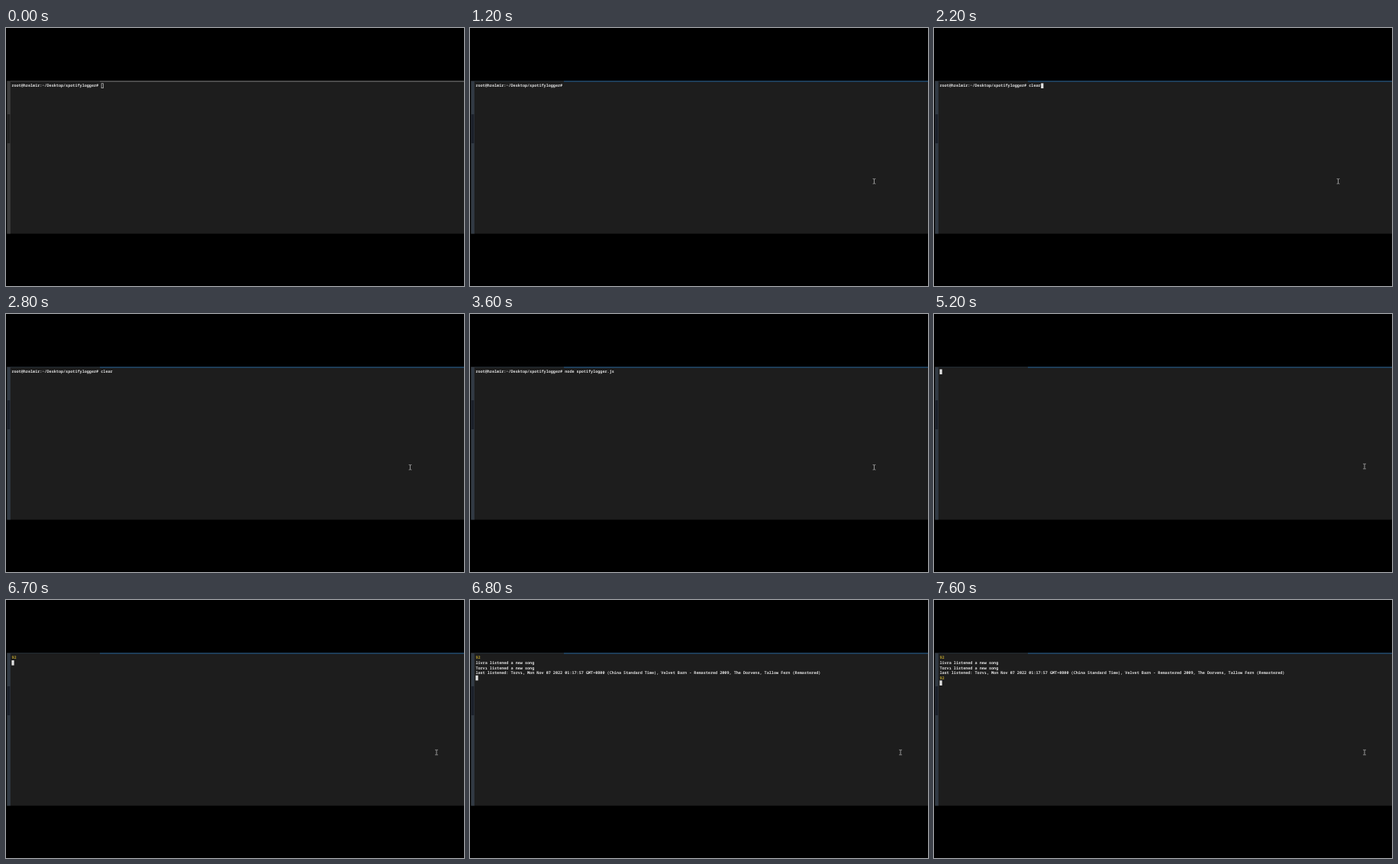
An HTML page for the animation above (8000 ms loop, 600 px wide and 338 px high).

```html
<!DOCTYPE html>
<html lang="en">
<head>
<meta charset="utf-8">
<title>Terminal session</title>
<style>
  html, body { margin: 0; width: 100%; height: 100%; overflow: hidden; background: #000; }
  svg { display: block; width: 100%; height: 100%; }
  text {
    font: 600 5.147px "Noto Sans Mono", "DejaVu Sans Mono", monospace;
    text-rendering: geometricPrecision;
    white-space: pre;
    fill: #dedede;
  }
</style>
</head>
<body>
<svg viewBox="0 0 600 338">
  <rect width="600" height="338" fill="#000"/>
  <rect x="1" y="69" width="599" height="200.5" fill="#1d1d1d"/>
  <rect id="rail" x="1.5" y="69.5" width="4.3" height="200"/>
  <rect id="thumb" x="1.5" y="113" width="3.8" height="38"/>
  <rect id="tabLine" x="6" y="69" width="117" height="1.2"/>
  <rect id="topLine" x="123" y="69" width="477" height="1.6"/>
  <g id="lines"></g>
  <rect id="caret"/>
  <path id="mouse" d="M-1.8-3.2H-.5L0-2.8.5-3.2H1.8M0-2.8V2.8M-1.8 3.2H-.5L0 2.8.5 3.2H1.8"
        fill="none" stroke="#b4b4b4" stroke-width=".8"/>
</svg>
<script>
const LOOP = 8000, BLINK = 600;
const LEFT = 7.4, TOP = 72.4, CHAR = 3.088, ROW = 6.6;
const $ = id => document.getElementById(id);

const prompt = "root@hzelmir:~/Desktop/spotifylogger# ";
const runLine = prompt + "node spotifylogger.js ";
const news = [
  "92",
  "livra listened a new song",
  "Torvı listened a new song",
  "last listened: Torvı, Mon Nov 07 2022 01:17:57 GMT+0800 (China Standard Time), " +
    "Velvet Barn - Remastered 2009, The Dorvens, Tallow Fern (Remastered)"
];

// Each state restarts the caret blink; the caret sits at [column, row].
const states = [
  { at: 0, text: [prompt], caret: [38, 0] },
  { at: 600, text: [prompt], caret: [38, 0] },
  { at: 2200, text: [prompt + "clear"], caret: [43, 0] },
  { at: 3000, text: [runLine], caret: [60, 0] },
  { at: 4300, text: [runLine], caret: [0, 1] },
  { at: 4600, text: ["Connected!"], caret: [0, 1] },
  { at: 5200, text: [], caret: [0, 0] },
  { at: 6700, text: ["92"], caret: [0, 1] },
  { at: 6800, text: news, caret: [0, 4] },
  { at: 7600, text: [...news, "92"], caret: [0, 5] }
];

const mousePath = [
  { at: 600, x: 529.5, y: 200.8 },
  { at: 5000, x: 546, y: 200.4 },
  { at: 5100, x: 560, y: 200 },
  { at: 5200, x: 564, y: 199.6 }
];

const last = (list, t) => list.filter(item => item.at <= t).pop();

function set(el, attrs) {
  for (const key in attrs) el.setAttribute(key, attrs[key]);
}

const rows = Array.from({ length: 6 }, (_, i) => {
  const el = document.createElementNS("http://www.w3.org/2000/svg", "text");
  set(el, { x: LEFT, y: TOP + 5 + i * ROW });
  $("lines").append(el);
  return el;
});

function draw(t) {
  const state = last(states, t);
  const focused = t >= 600;

  set($("rail"), { fill: focused ? "#323a44" : "#3d3d3d" });
  set($("thumb"), { fill: focused ? "#1c212b" : "#222" });
  set($("tabLine"), { fill: focused ? "#222a31" : "#3c3c3c" });
  set($("topLine"), { fill: focused ? "#1f4667" : "#565656" });

  rows.forEach((el, i) => {
    const line = state.text[i] || "";
    if (el.textContent !== line) el.textContent = line;
    el.style.fill = line === "92" ? "#b59b2c" : "";
  });

  const [col, row] = state.caret;
  const inset = focused ? 0 : 0.35;
  const shown = !focused || Math.floor((t - state.at) / BLINK) % 2 === 0;
  set($("caret"), {
    x: LEFT + col * CHAR + inset,
    y: TOP + row * ROW + inset,
    width: 3.2 - 2 * inset,
    height: 6.6 - 2 * inset,
    fill: focused ? "#e2e2e2" : "none",
    stroke: focused ? "none" : "#c8c8c8",
    "stroke-width": 0.7,
    visibility: shown ? "visible" : "hidden"
  });

  const mouse = last(mousePath, t);
  set($("mouse"), {
    visibility: mouse ? "visible" : "hidden",
    transform: mouse ? `translate(${mouse.x} ${mouse.y})` : ""
  });
}

const start = performance.now();
function frame() {
  draw((performance.now() - start) % LOOP);
  requestAnimationFrame(frame);
}
frame();
</script>
</body>
</html>
```
